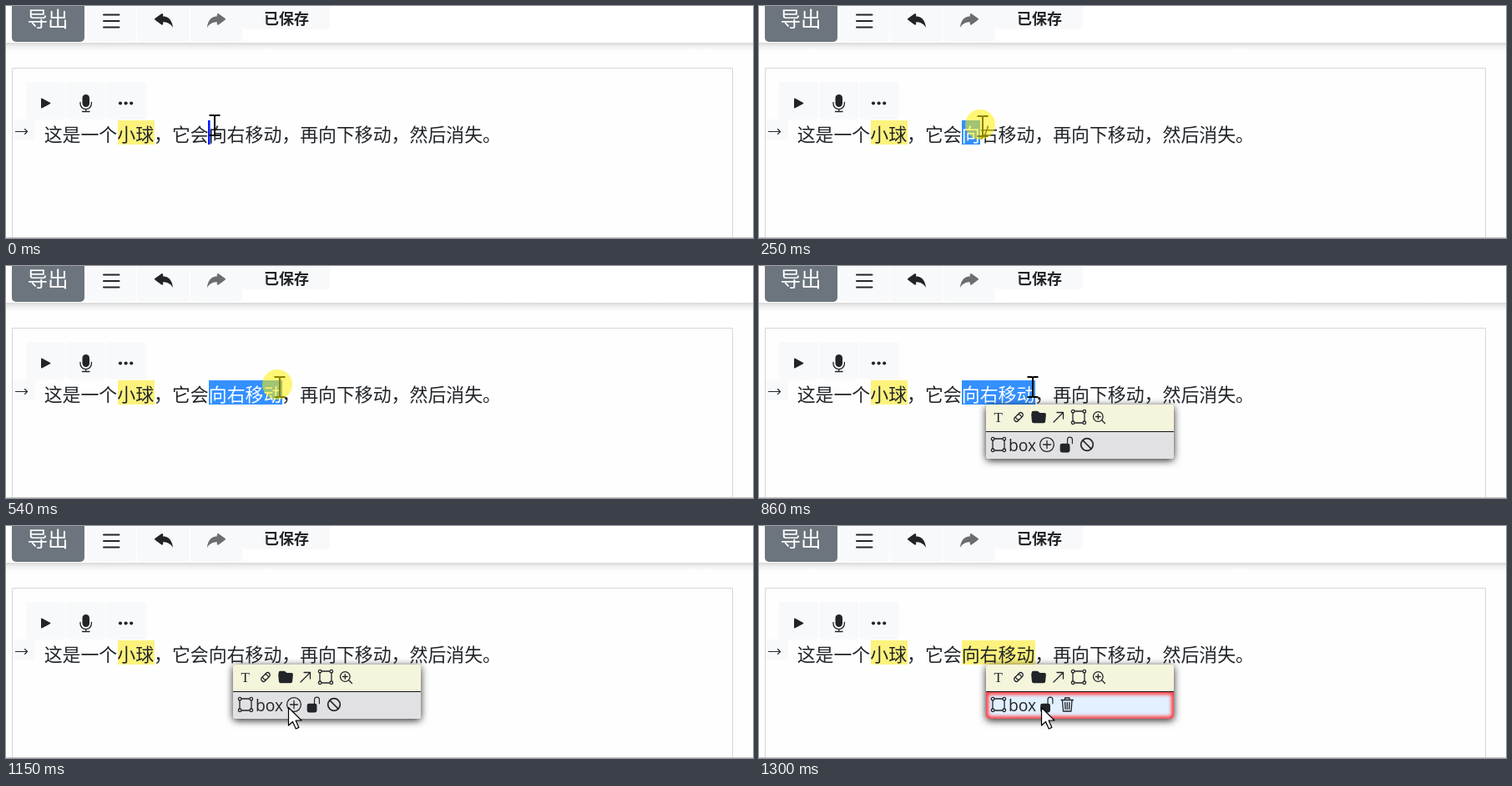
An HTML page for the animation above (1460 ms loop, 895 px wide and 278 px high).

```html
<!DOCTYPE html>
<html lang="zh-CN">
<head>
<meta charset="utf-8">
<title>Text selection menu</title>
<style>
html, body { margin: 0; width: 100%; height: 100%; overflow: hidden; background: #fefefe; }
svg { display: block; width: 895px; height: 278px; }
text { font-family: "Noto Sans CJK SC", "Noto Sans CJK", "Noto Sans", sans-serif; fill: #212529; white-space: pre; }
.body { font-size: 21.9px; }
.ink { fill: #212529; }
.line { fill: none; stroke: #212529; stroke-width: 1.3; stroke-linecap: round; stroke-linejoin: round; }
.pale { fill: #f8f9fa; }
</style>
</head>
<body>
<svg viewBox="0 0 895 278">
  <defs>
    <linearGradient id="fade" x2="0" y2="1">
      <stop offset="0" stop-color="#000" stop-opacity=".15"/>
      <stop offset=".45" stop-color="#000" stop-opacity=".055"/>
      <stop offset="1" stop-color="#000" stop-opacity="0"/>
    </linearGradient>
    <filter id="shadow" x="-20%" y="-60%" width="140%" height="220%">
      <feDropShadow dx="0" dy="2" stdDeviation="5" flood-color="#000" flood-opacity=".85"/>
    </filter>
    <filter id="glow" x="-10%" y="-50%" width="120%" height="200%"><feGaussianBlur stdDeviation="2.2"/></filter>
    <clipPath id="row"><path d="M272 199h225v28a4 4 0 0 1-4 4H276a4 4 0 0 1-4-4z"/></clipPath>
    <path id="reply" d="M5.921 11.9 1.353 8.62a.719.719 0 0 1 0-1.238L5.921 4.1A.716.716 0 0 1 7 4.719V6c1.5 0 6 0 7 8-2.5-4.5-7-4-7-4v1.281c0 .56-.606.898-1.079.62z"/>
    <g id="frame" class="line">
      <path d="M4.5 2h9M4.5 16h9M2 4.500v9M16 4.500v9"/>
      <circle cx="2.200" cy="2.200" r="1.800"/><circle cx="15.800" cy="2.200" r="1.800"/>
      <circle cx="2.200" cy="15.800" r="1.800"/><circle cx="15.800" cy="15.800" r="1.800"/>
    </g>
  </defs>

  <!-- toolbar -->
  <rect width="895" height="278" fill="#fefefe"/>
  <rect y="44" width="895" height="10" fill="url(#fade)"/>
  <rect width="895" height="44" fill="#fff"/>
  <rect x="7" y="-12" width="87" height="55" rx="5" fill="#6c757d"/>
  <text x="25.500" y="25" font-size="24.500" style="fill:#fff">导出</text>
  <g class="pale">
    <rect x="97" y="-10" width="59" height="53" rx="5"/>
    <rect x="157" y="-10" width="63" height="53" rx="5"/>
    <rect x="221" y="-10" width="62" height="53" rx="5"/>
    <rect x="283" y="-10" width="105" height="38" rx="5"/>
  </g>
  <path d="M117 10.500h18.500M117 18h18.500M117 25.500h18.500" class="line" style="stroke-width:2"/>
  <use href="#reply" class="ink" transform="translate(176.300 2.200) scale(1.700)"/>
  <use href="#reply" fill="#6b6e71" transform="translate(264.700 2.200) scale(-1.700 1.700)"/>
  <text x="309" y="21.500" font-size="18" font-weight="700">已保存</text>

  <!-- editor -->
  <path d="M7.500 278V74.500H870.500V278" fill="none" stroke="#d6d6d6"/>
  <path d="M0 277.500h895" stroke="#c4c4c4"/>
  <g class="pale">
    <rect x="24" y="91" width="47" height="45" rx="4"/>
    <rect x="72" y="91" width="47" height="45" rx="4"/>
    <rect x="120" y="91" width="48" height="45" rx="4"/>
    <rect x="8" y="136" width="27" height="25"/>
  </g>
  <path class="ink" d="M42 111.500q0-1.500 1.400-.8l9.400 5q1.300.8 0 1.600l-9.400 5q-1.400.7-1.400-.8z"/>
  <rect class="ink" x="91.500" y="106" width="8.500" height="15" rx="4.200"/>
  <path class="line" d="M89 115.500v1.500a6.700 6.700 0 0 0 13.400 0v-1.500M95.700 124v2.500M91.500 126.500h8.500"/>
  <g class="ink"><circle cx="137" cy="116.500" r="2.100"/><circle cx="143.600" cy="116.500" r="2.100"/><circle cx="150.200" cy="116.500" r="2.100"/></g>
  <path class="line" style="stroke-width:1.100" d="M11.500 150.500h14M22.500 147.500l3 3-3 3"/>

  <g fill="#fcf27c">
    <rect x="134" y="137" width="44" height="29"/>
    <rect id="mark" x="243" y="137" width="88" height="29"/>
  </g>
  <text class="body" x="45.700" y="161.500">这是一个小球，它会向右移动，再向下移动，然后消失。</text>
  <rect id="caret" x="242" y="137" width="2.600" height="29" fill="#0a1cff"/>
  <rect id="sel" x="243" y="137" height="29" fill="#3390ff"/>
  <text id="picked" class="body" x="242.800" y="161.500" style="fill:#fff"></text>

  <!-- popup -->
  <g id="popup">
    <rect x="272" y="166" width="225" height="65" rx="4" fill="#f5f5dc" filter="url(#shadow)"/>
    <g clip-path="url(#row)">
      <rect id="strip" x="272" y="199" width="225" height="32"/>
      <rect id="alert" x="272" y="199" width="225" height="32" rx="3" fill="none" stroke="#ff1c1c" stroke-width="5" filter="url(#glow)"/>
    </g>
    <path d="M272 198.500h225" stroke="#111"/>
    <text x="281.500" y="187" font-size="17" style="font-family:'Liberation Serif',serif">T</text>
    <g class="line" transform="translate(311 181) rotate(-45)">
      <path d="M-1.500 2.800h-2a2.800 2.800 0 0 1 0-5.600h4a2.800 2.800 0 0 1 2.300 4.300M1.500-2.800h2a2.800 2.800 0 0 1 0 5.600h-4a2.800 2.800 0 0 1-2.300-4.300"/>
    </g>
    <path class="ink" transform="translate(326 172.500) scale(1.130)" d="M9.828 3h3.982a2 2 0 0 1 1.992 2.181l-.637 7A2 2 0 0 1 13.174 14H2.825a2 2 0 0 1-1.991-1.819l-.637-7a2 2 0 0 1 .342-1.310L.5 3a2 2 0 0 1 2-2h3.672a2 2 0 0 1 1.414.586l.828.828A2 2 0 0 0 9.828 3z"/>
    <path class="line" d="M353 187l11.500-11.500M357 175.500h7.500v7.500"/>
    <use href="#frame" x="374" y="172"/>
    <path class="line" d="M400.500 180.500a5.800 5.800 0 1 0 11.600 0a5.800 5.800 0 1 0-11.600 0M410.500 184.500l4 4M403.500 180.500h5.600M406.300 177.700v5.600"/>
    <use href="#frame" x="278" y="205"/>
    <text x="299" y="222" font-size="19.300" style="font-family:'Open Sans','Noto Sans',sans-serif">box</text>
    <path id="lock" class="ink" d="M11 1a2 2 0 0 0-2 2v4a2 2 0 0 1 2 2v5a2 2 0 0 1-2 2H3a2 2 0 0 1-2-2V9a2 2 0 0 1 2-2h5V3a3 3 0 0 1 6 0v4a.5.5 0 0 1-1 0V3a2 2 0 0 0-2-2z"/>
    <g id="add" class="line">
      <circle cx="345" cy="214" r="8.400"/><path d="M340.500 214h9M345 209.500v9"/>
      <g style="stroke-width:1.700"><circle cx="393" cy="214" r="7.300"/><path d="M388 209l10 10"/></g>
    </g>
    <path id="bin" class="line" d="M362 208.500h14.500M366.500 208v-2h5.500v2M363.500 209l1 13h9.500l1-13M366.700 211.500l.3 8M369.300 211.500v8M371.900 211.500l-.3 8"/>
  </g>

  <!-- pointers -->
  <path id="beam" fill="none" stroke="#000" stroke-width="2" d="M-6.500-12h5q1.500 0 1.500 1.500q0-1.500 1.500-1.500h5M0-11v22M-6.500 12h5q1.500 0 1.500-1.500q0 1.500 1.500 1.500h5"/>
  <path id="arrow" fill="#fff" stroke="#000" stroke-width="1.200" stroke-linejoin="round" d="M.5.5v21.500l5-4.600 3.800 8.600 3.600-1.600-3.800-8.400h6.900z"/>
  <circle id="press" cy="142" r="18" fill="#fff000" fill-opacity=".54"/>
</svg>
<script>
const LOOP = 1460, CHAR = 21.9, PHRASE = "向右移动";
const el = id => document.getElementById(id);
const show = (id, on) => el(id).setAttribute("visibility", on ? "inherit" : "hidden");
const move = (id, x, y, extra = "") => el(id).setAttribute("transform", `translate(${x} ${y}) ${extra}`);

// Last row whose start time has passed.
const at = (rows, t) => rows.reduce((hit, row) => row[0] <= t ? row : hit);

// start, pointer x, pointer y, selected characters
const steps = [
  [0, 250, 143, 0], [250, 268, 144, 1], [310, 290, 144, 2],
  [390, 312, 144, 3], [460, 322, 144, 4], [540, 328, 145, 4],
  [920, 329, 151, 4], [1000, 333, 181, 4], [1070, 337, 206, 4],
  [1150, 338, 217, 0]
];

function draw(t) {
  const [, x, y, count] = at(steps, t);
  const pointing = t >= 1000, added = t >= 1300;

  show("caret", t < 250);
  show("sel", count > 0);
  el("sel").setAttribute("width", Math.round(count * CHAR));
  el("picked").textContent = PHRASE.slice(0, count);
  show("mark", added);

  show("popup", t >= 860);
  el("strip").setAttribute("fill", added ? "#e2f0ff" : "#e1e0e3");
  show("alert", added);
  show("add", !added);
  show("bin", added);
  move("lock", added ? 336 : 359.5, 204.5, "scale(1.18)");

  show("beam", !pointing);
  show("arrow", pointing);
  move(pointing ? "arrow" : "beam", x, y);
  show("press", t >= 70 && t < 860);
  el("press").setAttribute("cx", x - 3);
}

const start = performance.now();
function tick(now) {
  draw(Math.max(0, now - start) % LOOP);
  requestAnimationFrame(tick);
}
draw(0);
requestAnimationFrame(tick);
</script>
</body>
</html>
```
